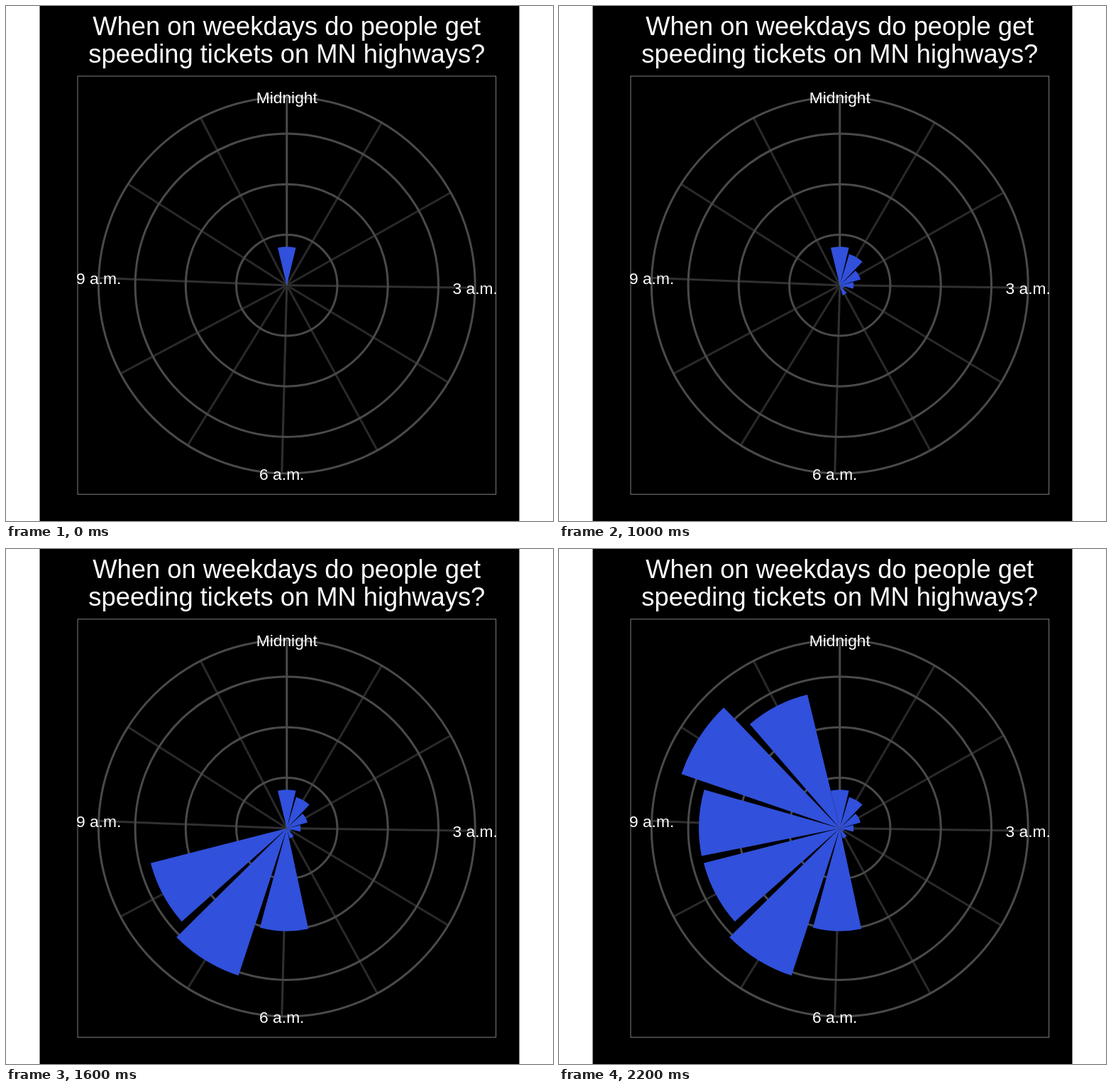
These frames come from a looping animation (771 by 726 pixels, 2400 ms). An HTML page:

```html
<!DOCTYPE html>
<html lang="en">
<head>
<meta charset="utf-8">
<title>Speeding tickets by hour</title>
<style>
  html, body { margin: 0; width: 100%; height: 100%; overflow: hidden; background: #fff; }
  svg { display: block; width: 771px; height: 726px; }
  text { font-family: "Liberation Sans", Arial, sans-serif; fill: #fff; text-anchor: middle; }
</style>
</head>
<body>
<svg id="chart" viewBox="0 0 771 726"></svg>
<script>
const chart = document.getElementById("chart");
const CX = 395.8, CY = 393.7, OUTER = 265.4;
const STEP_MS = 200;
const BAR_WIDTH = 0.9;
const bars = [54.4, 46, 30.4, 19.6, 6.2, 14.6, 145, 218.5, 198, 198.7, 236, 194];
// The dial spans from the first bar's left edge to the last bar's right edge.
const HOUR = 2 * Math.PI / (bars.length - 1 + BAR_WIDTH);

function add(tag, attrs, text) {
  const el = document.createElementNS("http://www.w3.org/2000/svg", tag);
  for (const key in attrs) el.setAttribute(key, attrs[key]);
  if (text) el.textContent = text;
  return chart.appendChild(el);
}

function point(hour, r) {
  const a = hour * HOUR;
  return [CX + r * Math.sin(a), CY - r * Math.cos(a)];
}

function spoke(hour, color) {
  const [x2, y2] = point(hour, OUTER);
  add("line", { x1: CX, y1: CY, x2, y2, stroke: color, "stroke-width": 3 });
}

function wedge(r, hour) {
  const from = point(hour - BAR_WIDTH / 2, r);
  const to = point(hour + BAR_WIDTH / 2, r);
  return add("path", {
    d: `M${CX} ${CY}L${from}A${r} ${r} 0 0 1 ${to}Z`,
    fill: "#3150db"
  });
}

function label(hour, text) {
  const [x, y] = point(hour, OUTER);
  add("text", { x, y: y + 8.5, "font-size": 22.8 }, text);
}

add("rect", { x: 47.5, y: 0, width: 676, height: 726, fill: "#000" });
for (let hour = 1; hour < 12; hour++) spoke(hour, hour % 3 ? "#292929" : "#303030");
spoke(0, "#4a4a4a");
for (const r of [71.2, 142.5, 213.7, OUTER])
  add("circle", { cx: CX, cy: CY, r, fill: "none", stroke: "#4a4a4a", "stroke-width": 3 });

const wedges = bars.map(wedge);

add("rect", { x: 101, y: 98.9, width: 589.6, height: 589.4, fill: "none", stroke: "#7f7f7f", "stroke-width": 1 });
["Midnight", "3 a.m.", "6 a.m.", "9 a.m."].forEach((text, i) => label(i * 3, text));
["When on weekdays do people get", "speeding tickets on MN highways?"].forEach((text, i) =>
  add("text", { x: CX, y: 41 + i * 39.2, "font-size": 36.3 }, text));

function render(ms) {
  const current = Math.floor(ms / STEP_MS) % bars.length;
  wedges.forEach((el, i) => el.setAttribute("visibility", i <= current ? "visible" : "hidden"));
}

let start;
function tick(now) {
  start ??= now;
  render(Math.max(0, now - start));
  requestAnimationFrame(tick);
}
render(0);
requestAnimationFrame(tick);
</script>
</body>
</html>
```
